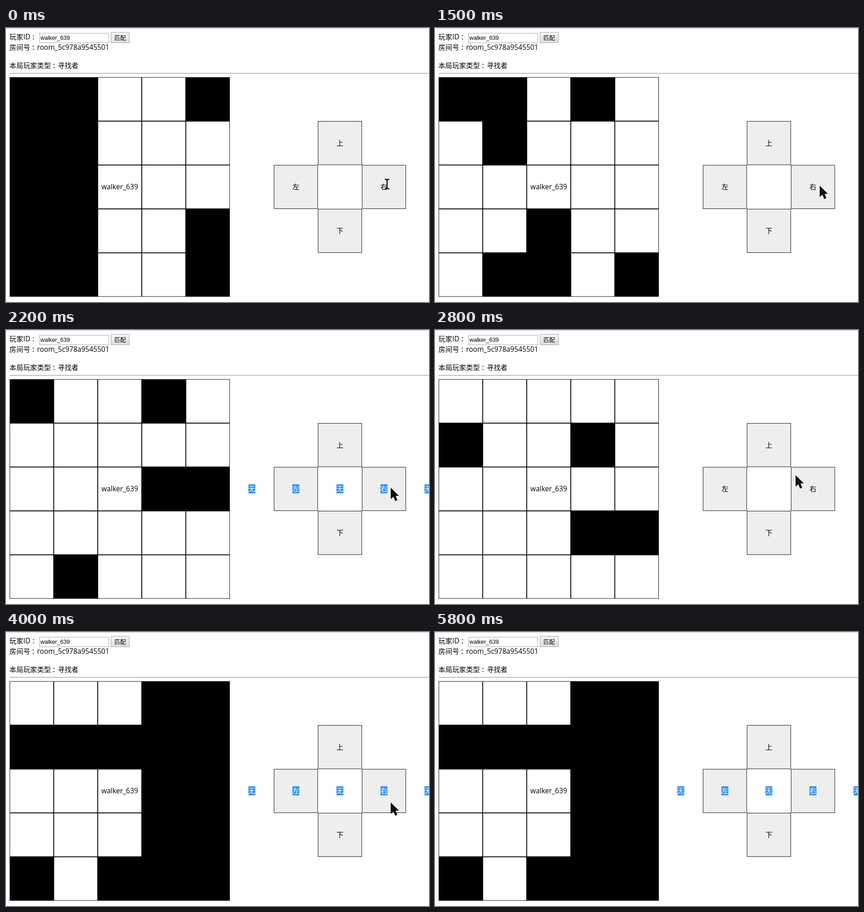
Recreate the animation shown at these times as an HTML page with a canvas. Size 928 px wide and 603 px high, loop 6.7 s.

```html
<!DOCTYPE html>
<html>
<head>
<meta charset="utf-8">
<title>迷宫</title>
<style>
html, body { margin: 0; width: 100%; height: 100%; overflow: hidden; background: #fff; }
canvas { display: block; }
</style>
</head>
<body>
<canvas id="stage" width="928" height="603"></canvas>
<script>
const ctx = document.getElementById('stage').getContext('2d');
const LOOP = 6700, STEP = 100;
const CELL = 96.61, LEFT = 8, UPPER = 108.3, BORDER = 0.95;
const CJK = '"Noto Sans CJK SC", "Noto Sans CJK", sans-serif';
const SANS = '"Open Sans", ' + CJK;
const ARIAL = '"Liberation Sans", ' + CJK;
const HAN = '350 15.15px ' + CJK;
const LATIN = '500 15.4px ' + SANS;
const SEEKER = 'walker_639', HIDER = 'walker_172';

// Maze rows from y = -4 downwards; '#' is a wall.
const MAZE = [
  '.............',
  '.##.#..#..###',
  '..#..........',
  '.......##....',
  '...#......#.#',
  '..##.#.......',
  '..#..........'
];
const TOP = -4, GOAL = { x: 12, y: -2 };

const MOVES = [
  [300, 'R'], [600, 'R'], [1000, 'U'], [1400, 'R'], [1600, 'R'], [1900, 'R'], [2200, 'R'],
  [2600, 'U'], [2900, 'R'], [3100, 'R'], [3300, 'R'], [3400, 'R'], [3700, 'R'], [3900, 'R']
];

// Pointer path: time, x, y
const PATH = [
  [0, 836, 343], [600, 836, 343], [900, 728, 267], [1100, 730, 266], [1400, 844, 347],
  [2300, 844, 347], [2600, 738, 264], [2700, 738, 264], [2900, 844, 375],
  [4500, 844, 375], [5100, 886, 100], [5300, 891, 60], [5500, 891, 60], [5800, 880, -32]
];

const colX = i => LEFT + CELL * i;
const rowY = i => UPPER + CELL * i;
const between = (t, a, b) => t >= a && t < b;
const fontFor = str => /[ -~]/.test(str) ? LATIN : HAN;

function rect(x, y, w, h, color) {
  ctx.fillStyle = color;
  ctx.fillRect(x, y, w, h);
}

function text(str, x, y, font, color = '#000', align = 'left') {
  ctx.font = font;
  ctx.fillStyle = color;
  ctx.textAlign = align;
  ctx.fillText(str, x, y);
}

// Sets Latin and Chinese runs in their own fonts, with the wide colon centred.
function line(str, x, y) {
  for (const run of str.match(/[ -~]+|：|[^ -~：]+/g)) {
    text(run, run === '：' ? x + 3 : x, y, fontFor(run));
    x += ctx.measureText(run).width;
  }
}

function cellBody(col, row, color) {
  const inner = CELL - 2 * BORDER;
  rect(colX(col) + BORDER, rowY(row) + BORDER, inner, inner, color);
}

function cellText(str, col, row, selected) {
  const x = colX(col + 0.5), y = rowY(row + 0.5);
  if (selected) rect(x - 7.6, y - 10.3, 15.2, 20, '#3390f0');
  text(str, x, y + 5.5, fontFor(str), selected ? '#fff' : '#000', 'center');
}

function isWall(x, y) {
  const row = MAZE[y - TOP];
  return !row || row[x] !== '.';
}

function playerAt(t) {
  const p = { x: 0, y: 0 };
  for (const [at, dir] of MOVES) {
    if (t < at) break;
    if (dir === 'R') p.x++; else p.y--;
  }
  return p;
}

function drawHeader() {
  rect(0, 0, 928, 1, '#bdbdbd');
  line('玩家ID：', 7.6, 25.3);
  line('房间号：room_5c978a9545501', 7.6, 48);
  line('本局玩家类型：寻找者', 7.6, 87.5);
  rect(8, 99, 920, 1, '#a0a0a0');
  rect(8, 100, 920, 1, '#dcdcdc');

  ctx.lineWidth = 1;
  ctx.strokeStyle = '#a6a6a6';
  ctx.strokeRect(73.5, 11.5, 152, 21);
  text(SEEKER, 75.5, 26, '12.65px ' + ARIAL);

  const shade = ctx.createLinearGradient(0, 10, 0, 33);
  shade.addColorStop(0, '#f6f6f6');
  shade.addColorStop(1, '#dcdcdc');
  rect(230, 9, 41, 24, shade);
  ctx.strokeRect(230.5, 9.5, 40, 23);
  text('匹配', 250.5, 26, '12.65px ' + ARIAL, '#000', 'center');
}

function drawMaze(p) {
  rect(LEFT, UPPER, CELL * 5, CELL * 5, '#000');
  for (let r = 0; r < 5; r++) {
    for (let c = 0; c < 5; c++) {
      if (!isWall(p.x + c - 2, p.y + r - 2)) cellBody(c, r, '#fff');
    }
  }
  cellText(SEEKER, 2, 2);
  const c = GOAL.x - p.x + 2, r = GOAL.y - p.y + 2;
  if (p.x < GOAL.x && c < 5 && r >= 0) cellText(HIDER, c, r);
}

function drawPad(t) {
  const all = between(t, 1900, 2600) || t >= 3900;
  const right = all || between(t, 600, 1000);
  const keys = [['上', 7, 1, false], ['左', 6, 2, all], ['右', 8, 2, right], ['下', 7, 3, false]];
  for (const [label, c, r, selected] of keys) {
    rect(colX(c), rowY(r), CELL, CELL, '#000');
    cellBody(c, r, '#eee');
    cellText(label, c, r, selected);
  }
  if (all) for (const c of [5, 7, 9]) cellText('无', c, 2, true);
}

function drawDialog(t) {
  if (!between(t, 4400, 5500)) return;
  ctx.save();
  ctx.globalAlpha = t < 4500 ? 0.6 : 1;
  ctx.shadowColor = 'rgba(0,0,0,.5)';
  ctx.shadowBlur = 6;
  ctx.shadowOffsetY = 1;
  rect(515.5, -60, 440, 150.5, '#fff');
  ctx.shadowColor = 'transparent';
  text('显示', 672, 0.5, '14.5px ' + SANS, '#333');
  text('游戏结束~胜者是：' + SEEKER, 530, 25, '12.4px ' + SANS, '#666');
  ctx.beginPath();
  ctx.roundRect(864, 45, 61, 31, 3);
  ctx.fillStyle = '#4285f4';
  ctx.fill();
  ctx.strokeStyle = '#a9c8fb';
  ctx.lineWidth = 1;
  ctx.stroke();
  text('确定', 894.7, 65, '12px ' + SANS, '#fff', 'center');
  ctx.restore();
}

function pointerAt(t) {
  const i = PATH.findIndex(k => k[0] > t);
  if (i < 0) return null;
  const [t0, x0, y0] = PATH[i - 1], [t1, x1, y1] = PATH[i];
  const u = (t - t0) / (t1 - t0), e = u * u * (3 - 2 * u);
  return [x0 + (x1 - x0) * e, y0 + (y1 - y0) * e];
}

function drawPointer(t) {
  const pos = pointerAt(t);
  if (!pos) return;
  ctx.save();
  ctx.translate(...pos);
  if (t <= 600) {
    ctx.strokeStyle = '#111';
    ctx.lineWidth = 2.5;
    ctx.stroke(new Path2D('M-5-10H-2L0-8L2-10H5M0-8V9M-5 11H-2L0 9L2 11H5'));
  } else {
    ctx.fillStyle = '#111';
    ctx.fill(new Path2D('M0 0V25L6 20L10 29.5L14.5 27.5L11 18H18Z'));
  }
  ctx.restore();
}

function draw(now) {
  const t = Math.floor((now % LOOP) / STEP) * STEP;
  rect(0, 0, 928, 603, '#fff');
  drawHeader();
  drawMaze(playerAt(t));
  drawPad(t);
  drawDialog(t);
  drawPointer(t);
}

const start = performance.now();
function frame() {
  draw(performance.now() - start);
  requestAnimationFrame(frame);
}
frame();
</script>
</body>
</html>
```
